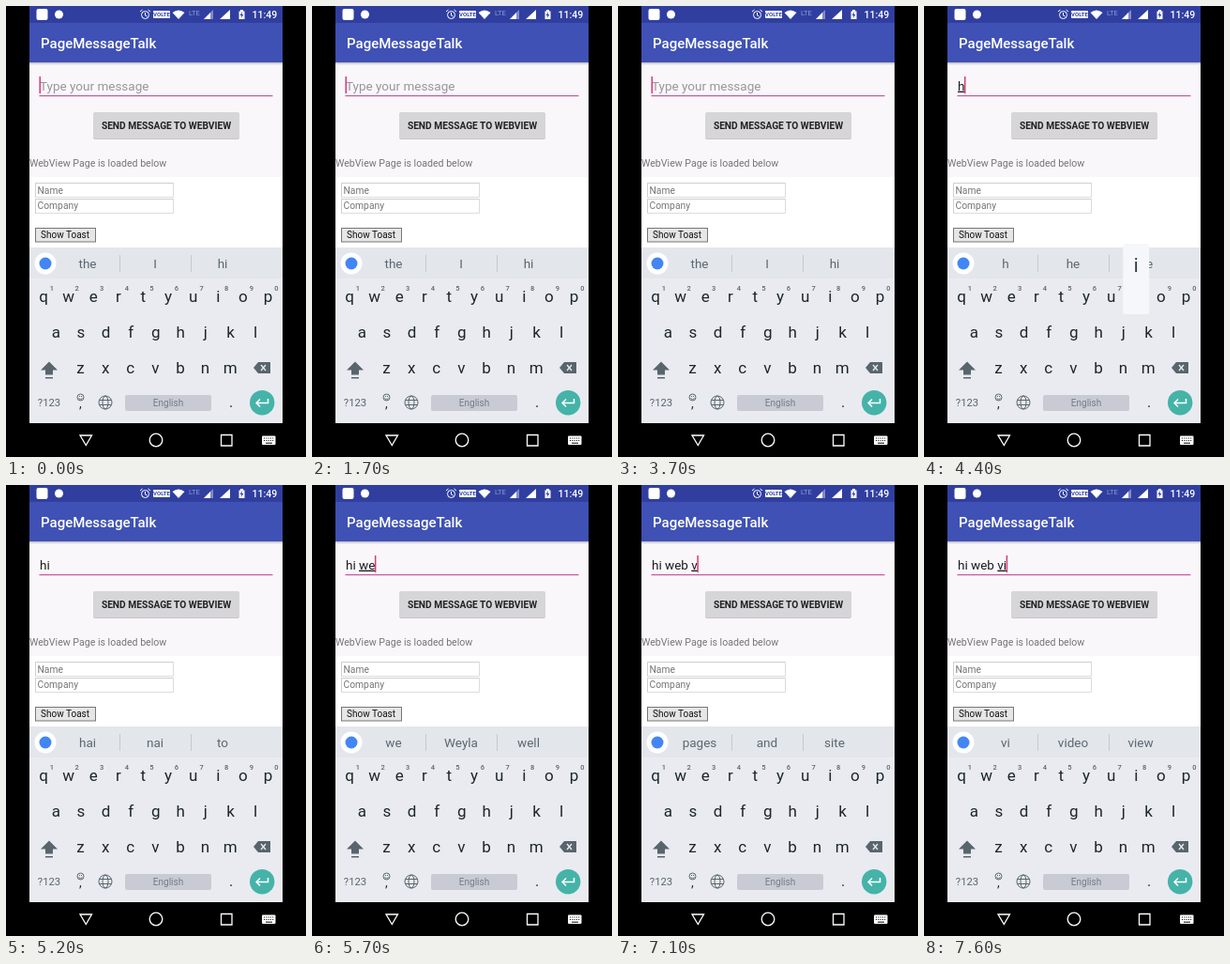
An HTML page that plays this animation: 320 by 480 pixels, repeating every 8 s.

```html
<!DOCTYPE html>
<html lang="en">
<head>
<meta charset="utf-8">
<style>
html, body { margin: 0; width: 100%; height: 100%; overflow: hidden; background: #000; }
svg { display: block; width: 320px; height: 480px; font-family: Roboto, sans-serif; }
text { white-space: pre; }
.mid { text-anchor: middle; }
.medium { font-weight: 500; }
.line { fill: none; stroke-width: 1; }
#keys { font-size: 17px; fill: #1c262b; }
#keys .hint { font-size: 7.5px; font-weight: 500; fill: #59656d; }
#hints { font-size: 13.5px; fill: #5a6870; }
#word { text-decoration: underline #666 1px; }
</style>
</head>
<body>
<svg viewBox="0 0 320 480">
  <defs>
    <linearGradient id="shade" x2="0" y2="1">
      <stop stop-color="#000" stop-opacity=".25"/><stop offset="1" stop-color="#000" stop-opacity="0"/>
    </linearGradient>
  </defs>
  <rect width="320" height="480"/>
  <rect x="25" y="60" width="270" height="122" fill="#f9f7fa"/>
  <rect x="25" y="182" width="270" height="75" fill="#fff"/>
  <rect x="25" width="270" height="18" fill="#303f9f"/>
  <rect x="25" y="18" width="270" height="42" fill="#3f51b5"/>
  <rect x="25" y="60" width="270" height="3" fill="url(#shade)"/>

  <!-- status bar -->
  <g fill="#fff">
    <rect x="32.5" y="3" width="12" height="12" rx="2"/>
    <circle cx="56.5" cy="9" r="4.5"/>
    <g class="line" stroke="#fff">
      <circle cx="148.5" cy="9.5" r="4"/>
      <path d="M148.5 7v3l2 1M143 6l2.5-2M154 6l-2.5-2"/>
    </g>
    <rect x="157" y="5" width="18" height="8" rx="1"/>
    <path d="M177.5 7Q184 2 190.5 7L184 14Z"/>
    <path d="M221 4v10H211Z" opacity=".4"/>
    <path d="M218 7v7H211ZM239 4v10H228Z"/>
    <path d="M248.5 5.5h1.500V4h3v1.500h1.500V14h-6Z"/>
    <text class="medium" x="262.5" y="13" font-size="10.5">11:49</text>
  </g>
  <text class="mid" x="166" y="11.2" font-size="6" font-weight="700" fill="#303f9f">VOLTE</text>
  <text x="195" y="9.5" font-size="7.5" fill="#8f99d2">LTE</text>
  <path d="M252 6l-2.500 4h1.700l-.5 3 2.600-4h-1.700Z" fill="#303f9f"/>
  <text class="medium" x="37" y="45" font-size="15" fill="#fff">PageMessageTalk</text>

  <!-- form -->
  <g font-size="13.5">
    <text id="prompt" x="36" y="89.7" fill="#98969b">Type your message</text>
    <text id="entry" x="36" y="89.7" fill="#1c1c1c"><tspan id="done"></tspan><tspan id="word"></tspan></text>
  </g>
  <rect x="35.5" y="95" width="249" height="1.2" fill="#c9569c"/>
  <rect id="cursor" y="75" width="1.5" height="18" fill="#d43c78"/>
  <rect x="93" y="114" width="156" height="28" rx="2" fill="#c9c7cb"/>
  <rect x="93" y="113" width="156" height="28" rx="2" fill="#d6d5d7"/>
  <text class="mid" x="171" y="131" font-size="10.2" font-weight="700" fill="#222">SEND MESSAGE TO WEBVIEW</text>
  <text x="25" y="171.3" font-size="10.6" fill="#757575">WebView Page is loaded below</text>
  <path class="line" d="M31.5 188.5h147v15h-147ZM31.5 205.5h147v15h-147Z" stroke="#dcdcdc"/>
  <path class="line" d="M31.5 203.5v-15h147M31.5 220.5v-15h147" stroke="#cfcfcf"/>
  <g font-size="10.3" fill="#757575">
    <text x="33.5" y="199.5">Name</text>
    <text x="33.5" y="216">Company</text>
  </g>
  <rect x="31.5" y="236.5" width="64" height="14.5" fill="#e6e6e6" stroke="#777"/>
  <text x="37" y="247" font-size="10" fill="#111">Show Toast</text>

  <!-- keyboard -->
  <rect x="25" y="257" width="270" height="187" fill="#e9ebf1"/>
  <rect x="25" y="257" width="270" height="33" fill="#e3e6eb"/>
  <circle cx="42" cy="274" r="11.5" fill="#fff"/>
  <circle cx="42" cy="274" r="6.5" fill="#4285f4"/>
  <path d="M121.5 265v18M197.5 265v18" stroke="#c6cad0"/>
  <g id="hints" class="mid">
    <text x="87" y="279"></text><text x="159" y="279"></text><text x="231" y="279"></text>
  </g>
  <g id="keys" class="mid"></g>
  <g fill="#59656d">
    <path d="M46 378.5l9 9h-5v5h-8v-5h-5ZM42 395h8v1.500h-8Z"/>
    <path d="M264 385l5-6h13v12h-13Z"/>
    <text class="mid" x="46" y="426" font-size="11.3">?123</text>
    <text class="mid" x="79.5" y="428" font-size="14" fill="#263238">,</text>
    <text class="mid" x="240" y="427" font-size="16" fill="#263238">.</text>
  </g>
  <path d="M272 382l5 6M277 382l-5 6" stroke="#e9ebf1" stroke-width="1.3"/>
  <g class="line" stroke="#59656d">
    <circle cx="79.5" cy="416.5" r="3.5"/>
    <path d="M77.5 417.5q2 2.500 4 0M78 415.5h1M80 415.5h1"/>
    <circle cx="106" cy="422" r="7"/>
    <ellipse cx="106" cy="422" rx="3" ry="7"/>
    <path d="M99.5 419.5h13M99.5 424.5h13"/>
  </g>
  <rect id="space" x="127" y="414" width="92" height="17" rx="2"/>
  <text class="mid" x="173" y="426" font-size="10" fill="#737c86">English</text>
  <circle cx="273.2" cy="422.2" r="13.2" fill="#45b3a8"/>
  <path class="line" d="M279.5 418v4.500h-12M271 418.5l-4 4 4 4" stroke="#fff" style="stroke-width:1.5"/>
  <g id="popup">
    <rect x="-14" y="-56" width="28" height="75" rx="2" fill="#f6f7fa"/>
    <text class="mid" y="-26" font-size="20" fill="#263238"></text>
  </g>

  <!-- navigation bar -->
  <g class="line" stroke="#fff" style="stroke-width:1.3">
    <path d="M79 457h12.500l-6.200 10.500ZM229.5 456.5h11.500v11.500h-11.500Z"/>
    <circle cx="160" cy="462" r="6.8"/>
  </g>
  <rect x="273" y="457.5" width="14.5" height="9.5" rx="1" fill="#fff"/>
  <path d="M275 460h11M275 462.5h11" stroke="#000" stroke-dasharray="1 1.300"/>
  <path d="M277 465.2h7" stroke="#000"/>
</svg>
<script>
const LOOP = 8000, PRESS = 100;
const $ = id => document.getElementById(id);

// time the letter lands, letter, time the suggestions follow, suggestions
const strokes = [
  [4200, 'h', 4200, 'h he here'],
  [4500, 'i', 4600, 'hi his high'],
  [4700, ' ', 4800, 'hai nai to'],
  [5400, 'w', 5500, 'w with would'],
  [5600, 'e', 5700, 'we Weyla well'],
  [6200, 'b', 6300, 'web Web website'],
  [6400, ' ', 6500, 'pages and site'],
  [7100, 'v', 7200, 'v very version'],
  [7600, 'i', 7600, 'vi video view']
];

const keyPos = {};
function addKey(x, y, label, cls = '') {
  $('keys').insertAdjacentHTML('beforeend', `<text x="${x}" y="${y}" class="${cls}">${label}</text>`);
}
[['qwertyuiop', 40, 309], ['asdfghjkl', 53.3, 347], ['zxcvbnm', 79.5, 385]].forEach(([row, left, y], r) => {
  [...row].forEach((key, i) => {
    const x = left + i * 26.6;
    keyPos[key] = [x, y];
    addKey(x, y + 6, key);
    if (r === 0) addKey(x + 9, y - 6.5, (i + 1) % 10, 'hint');
  });
});

function draw(t) {
  let text = '', last = -300, hints = 'the I hi', pressed = '';
  for (const [at, key, hintAt, next] of strokes) {
    if (t >= at - PRESS && t < at) pressed = key;
    if (t >= at) { text += key; last = at; }
    if (t >= hintAt) hints = next;
  }
  const split = text.lastIndexOf(' ') + 1;
  $('done').textContent = text.slice(0, split);
  $('word').textContent = text.slice(split);
  $('prompt').style.display = text ? 'none' : '';
  $('cursor').setAttribute('x', 35.5 + (text ? $('entry').getComputedTextLength() : 0));
  $('cursor').style.display = (t - last) % 1000 < 500 ? '' : 'none';

  hints.split(' ').forEach((hint, i) => $('hints').children[i].textContent = hint);
  $('space').setAttribute('fill', pressed === ' ' ? '#b7bbc4' : '#c8cbd3');
  const pos = keyPos[pressed];
  $('popup').style.display = pos ? '' : 'none';
  if (pos) {
    $('popup').setAttribute('transform', `translate(${pos})`);
    $('popup').lastElementChild.textContent = pressed;
  }
}

const start = performance.now();
function tick() {
  draw((performance.now() - start) % LOOP);
  requestAnimationFrame(tick);
}
tick();
</script>
</body>
</html>
```
